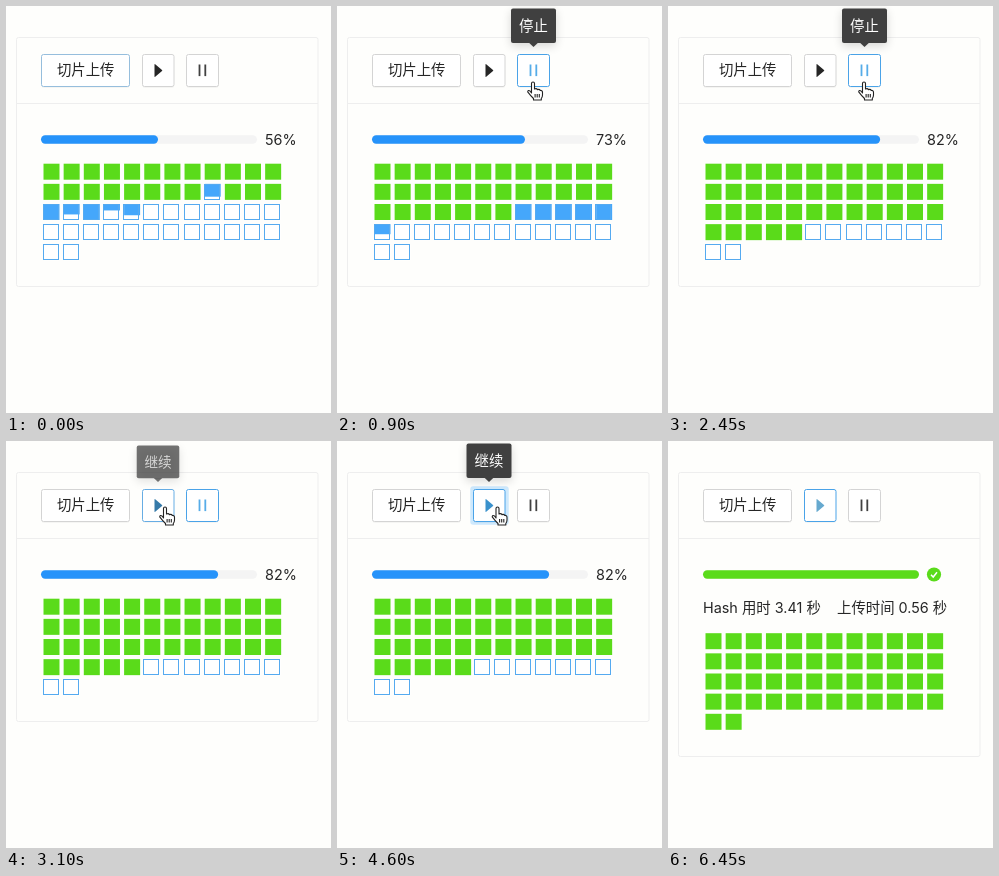
Animation, 325 px wide and 407 px high, one loop 6500 ms. Source, as an HTML page with a canvas:

```html
<!DOCTYPE html>
<html lang="zh-CN">
<head>
<meta charset="utf-8">
<title>切片上传</title>
<style>
  html, body { margin: 0; width: 100%; height: 100%; overflow: hidden; background: #fefefc; }
  canvas { display: block; width: 325px; height: 407px; }
</style>
</head>
<body>
<canvas></canvas>
<script>
const LOOP = 6500, TOTAL = 50, PAUSED = 1950, RESUMED = 4650, DONE = 5050;
const BLUE = [38, 147, 250], GREEN = [90, 219, 26], INK = [38, 38, 38];
const canvas = document.querySelector('canvas');
const ctx = canvas.getContext('2d');
const dpr = window.devicePixelRatio || 1;
canvas.width = 325 * dpr;
canvas.height = 407 * dpr;

const clamp = v => Math.max(0, Math.min(1, v));
const ramp = (t, a, b) => clamp((t - a) / (b - a));
const mix = (a, b, k) => a + (b - a) * k;
const easeOut = k => 1 - (1 - k) ** 3;
const easeInOut = k => k * k * (3 - 2 * k);
const rgb = (a, b = a, k = 0) => `rgb(${a.map((v, i) => Math.round(mix(v, b[i], k)))})`;

function roundRect(x, y, w, h, r, fill, stroke) {
  ctx.beginPath();
  ctx.roundRect(x, y, w, h, r);
  if (fill) { ctx.fillStyle = fill; ctx.fill(); }
  if (stroke) { ctx.strokeStyle = stroke; ctx.lineWidth = 1; ctx.stroke(); }
}

function text(str, x, y, color = '#262626', align = 'left') {
  ctx.font = '14.4px Inter, "Noto Sans CJK SC", "Noto Sans CJK", sans-serif';
  ctx.textAlign = align;
  ctx.fillStyle = color;
  ctx.fillText(str, x, y);
}

// Upload state
function percent(t) {
  if (t < PAUSED) return 56 + 0.0185 * t;
  return 82 + 18 * ramp(t, RESUMED, 5000);
}

function barPercent(t) {
  if (t < PAUSED) return percent(t - 100);
  if (t < RESUMED) return mix(percent(PAUSED - 100), 82, easeOut(ramp(t, PAUSED, PAUSED + 350)));
  return percent(t - 250);
}

const slowChunks = { 20: 0.8, 25: 0.65, 27: 0.4, 28: 0.7 };

function chunk(i, t) {
  let finished, front;
  if (t < PAUSED) {
    finished = t < 900 ? mix(24, 31, t / 900) : mix(31, 41, ramp(t, 900, 1780));
    front = 28.7 + 0.0088 * t;
    const slow = slowChunks[i];
    if (slow && t < 300) return { fill: clamp(slow + t / 400), done: i === 20 && t > 150 };
  } else {
    finished = 41 + 9 * ramp(t, RESUMED + 120, DONE);
    front = 41 + 9 * ramp(t, RESUMED, 5000);
  }
  return { done: i < Math.floor(finished), fill: clamp(front - i) };
}

function drawChunks(t, top) {
  for (let i = 0; i < TOTAL; i++) {
    const x = 37.5 + (i % 12) * 20.15, y = top + Math.floor(i / 12) * 20.15;
    const { done, fill } = chunk(i, t);
    if (done) {
      ctx.fillStyle = rgb(GREEN);
      ctx.fillRect(x, y, 16, 16);
    } else {
      ctx.fillStyle = '#fff';
      ctx.fillRect(x, y, 16, 16);
      ctx.fillStyle = '#45a7fb';
      ctx.fillRect(x, y, 16, 16 * fill);
      ctx.strokeStyle = '#55aaf0';
      ctx.lineWidth = 1;
      ctx.strokeRect(Math.round(x) - 0.5, Math.round(y) + 0.5, 15, 15);
    }
  }
}

function drawProgress(t) {
  const done = t >= DONE;
  roundRect(35, 129.3, 216, 8.4, 4.2, '#f4f4f4');
  roundRect(35, 129.3, 2.16 * barPercent(t), 8.4, 4.2, rgb(BLUE, GREEN, easeOut(ramp(t, DONE, DONE + 300))));
  if (!done) return text(Math.round(percent(t)) + '%', 259, 138.8);
  ctx.beginPath();
  ctx.arc(266, 133.5, 7.1, 0, 7);
  ctx.fillStyle = rgb(GREEN);
  ctx.fill();
  ctx.strokeStyle = '#fff';
  ctx.lineWidth = 1.5;
  ctx.stroke(new Path2D('M263 133.7l2.2 2.3 3.8-4.8'));
  text('Hash 用时 3.41 秒', 35, 172);
  text('上传时间 0.56 秒', 169, 172);
}

// Toolbar
function drawButton(x, w, active) {
  roundRect(x + 0.5, 50, w, 32, 2, 'rgba(0,0,0,.035)');
  roundRect(x + 0.5, 48.5, w, 32, 2, '#fff', rgb([212, 212, 212], [74, 163, 232], active));
}

function drawToolbar(t) {
  const play = ramp(t, 2920, 3150);
  const pause = ramp(t, 600, 800) * (1 - ramp(t, 4430, 4590));
  drawButton(35, 88, 0.45 * (1 - ramp(t, 50, 300)));
  text('切片上传', 79.7, 69.4, '#262626', 'center');

  const wave = ramp(t, 4430, 4900);
  if (wave > 0 && wave < 1) {
    const grow = 1 + 3 * easeOut(wave);
    roundRect(136.5 - grow, 48.5 - grow, 32 + 2 * grow, 32 + 2 * grow, 3, `rgba(64,169,255,${0.4 * (1 - wave)})`);
  }
  drawButton(136, 31.5, play);
  const playInk = t > 5000 ? [102, 169, 207] : [58, 145, 204];
  ctx.fillStyle = rgb(INK, playInk, play);
  ctx.fill(new Path2D('M148.5 58.6v11.8q0 .8.7.3l6.8-5.6q.6-.6 0-1.2l-6.8-5.6q-.7-.5-.7.3z'));

  drawButton(180, 32, pause);
  ctx.fillStyle = rgb([65, 65, 65], [86, 172, 232], pause);
  ctx.fillRect(192.6, 58.5, 1.8, 11.6);
  ctx.fillRect(198.4, 58.5, 1.8, 11.6);
}

function drawTooltip(label, x, shown) {
  if (shown <= 0) return;
  ctx.save();
  ctx.globalAlpha = shown;
  ctx.translate(x, 41);
  ctx.scale(mix(0.8, 1, shown), mix(0.8, 1, shown));
  ctx.shadowColor = 'rgba(0,0,0,.16)';
  ctx.shadowBlur = 10 * dpr;
  ctx.shadowOffsetY = 3 * dpr;
  roundRect(-22.5, -38.5, 45, 34.5, 2, '#404040');
  ctx.shadowColor = 'transparent';
  ctx.fill(new Path2D('M-4.5-4.2h9L0 0z'));
  text(label, 0, -15.8, '#fff', 'center');
  ctx.restore();
}

// Pointer: [time, x, y] of the hotspot
const path = [
  [50, 328, 318], [650, 196, 76], [2700, 196, 76], [2980, 159, 66],
  [3250, 159, 66], [3400, 160.5, 66], [5400, 160.5, 66], [5700, 176, 328], [6050, 184, 410]
];
const hand = new Path2D('M5 12V2.5a1.5 1.5 0 0 1 3 0V8q2-1 3 .6 2-.6 2.8.8 2.2-.2 2.2 2v2.6q0 2-1.2 3.5V19H7v-1.5Q4 14.5 1.2 10.8q.4-2.2 2.3-.8z');
const fingers = new Path2D('M8.6 13v3.5M10.7 13v3.5M12.8 13v3.5');
const arrow = new Path2D('M0 0V15l3.5-3.3 2.3 5.3 2.4-1-2.3-5.2H11z');

function drawPointer(t) {
  const next = path.findIndex(p => p[0] > t);
  if (next < 1) return;
  const [t0, x0, y0] = path[next - 1], [t1, x1, y1] = path[next];
  const k = easeInOut(ramp(t, t0, t1));
  const x = mix(x0, x1, k), y = mix(y0, y1, k);
  const overButton = y > 48 && y < 81 && ((x > 136 && x < 168) || (x > 180 && x < 213));
  ctx.save();
  ctx.lineJoin = 'round';
  ctx.lineWidth = 1.1;
  if (overButton) {
    ctx.translate(x - 6.5, y - 1);
    ctx.fillStyle = '#fff';
    ctx.strokeStyle = '#222';
    ctx.fill(hand);
    ctx.stroke(hand);
    ctx.stroke(fingers);
  } else {
    ctx.translate(x, y);
    ctx.fillStyle = '#111';
    ctx.strokeStyle = '#fff';
    ctx.fill(arrow);
    ctx.stroke(arrow);
  }
  ctx.restore();
}

function render(t) {
  const shift = t >= DONE ? 34.5 : 0;
  ctx.setTransform(dpr, 0, 0, dpr, 0, 0);
  ctx.fillStyle = '#fefefc';
  ctx.fillRect(0, 0, 325, 407);
  roundRect(10.5, 31.5, 301.5, Math.floor(249.5 + shift), 2, null, '#eeeeee');
  ctx.fillStyle = '#eeeeee';
  ctx.fillRect(11, 97, 301, 1);
  drawToolbar(t);
  drawProgress(t);
  drawChunks(t, 157.7 + shift);
  drawTooltip('停止', 196.5, ramp(t, 650, 780) * (1 - ramp(t, 2850, 2980)));
  drawTooltip('继续', 152, ramp(t, 3010, 3135) * (1 - ramp(t, 5550, 5690)));
  drawPointer(t);
}

const start = performance.now();
function frame() {
  render((performance.now() - start) % LOOP);
  requestAnimationFrame(frame);
}
frame();
</script>
</body>
</html>
```
